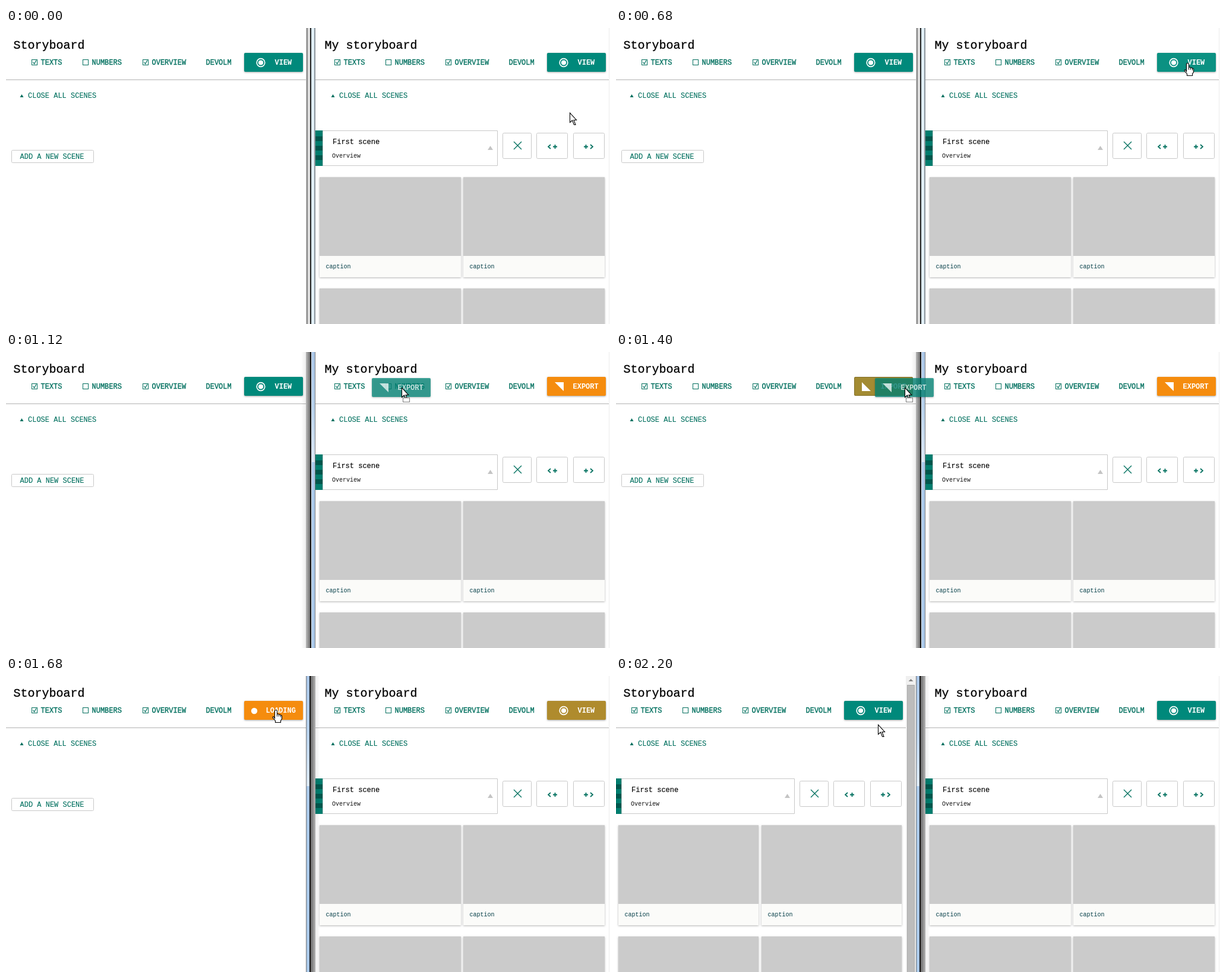
These frames come from a looping animation (1017x500 px, 3320 ms). An HTML page with a canvas:

```html
<!DOCTYPE html>
<html lang="en">
<head>
<meta charset="utf-8">
<title>Storyboard drag and drop</title>
<style>
html, body { margin: 0; width: 100%; height: 100%; overflow: hidden; background: #fff; }
canvas { display: block; }
</style>
</head>
<body>
<canvas id="stage" width="1017" height="500"></canvas>
<script>
const ctx = document.getElementById('stage').getContext('2d');
const LOOP = 3320, STEP = 40;
const TEAL = [0, 137, 123], HOVER = [11, 145, 130], ORANGE = [245, 140, 14];
const INK = '#00705f', LINE = '#c8c8c8', GREY = '#cbcbcb';

const ramp = (t, a, b) => Math.min(1, Math.max(0, (t - a) / (b - a)));
const lerp = (a, b, u) => a + (b - a) * u;
const smooth = u => u * u * (3 - 2 * u);
const mix = (a, b, u) => a.map((v, i) => Math.round(lerp(v, b[i], u)));
const rgb = c => `rgb(${c})`;

function rect(x, y, w, h, color) {
  ctx.fillStyle = color;
  ctx.fillRect(x, y, w, h);
}

function poly(points, color) {
  ctx.beginPath();
  points.forEach(([x, y]) => ctx.lineTo(x, y));
  ctx.closePath();
  ctx.fillStyle = color;
  ctx.fill();
}

function lines(color, width, ...paths) {
  ctx.strokeStyle = color;
  ctx.lineWidth = width;
  ctx.beginPath();
  for (const path of paths)
    path.forEach(([x, y], i) => i ? ctx.lineTo(x, y) : ctx.moveTo(x, y));
  ctx.stroke();
}

function disc(x, y, r, color) {
  ctx.beginPath();
  ctx.arc(x, y, r, 0, 7);
  ctx.fillStyle = color;
  ctx.fill();
}

function outline(x, y, w, h, r = 2) {
  ctx.beginPath();
  ctx.roundRect(x + .5, y + .5, w - 1, h - 1, r);
  ctx.strokeStyle = LINE;
  ctx.lineWidth = 1;
  ctx.stroke();
}

function text(s, x, y, size, color, { bold = false, heavy = 0 } = {}) {
  ctx.font = `${bold ? 'bold ' : ''}${size}px "Liberation Mono", monospace`;
  ctx.fillStyle = color;
  ctx.fillText(s, x, y);
  if (heavy) {
    ctx.strokeStyle = color;
    ctx.lineWidth = heavy;
    ctx.strokeText(s, x, y);
  }
}

function shadow(color, blur, dy) {
  ctx.shadowColor = color;
  ctx.shadowBlur = blur;
  ctx.shadowOffsetY = dy;
}

function button(x, y, label, color, pressed) {
  ctx.save();
  if (!pressed) shadow('rgba(0,0,0,.35)', 3, 1);
  ctx.beginPath();
  ctx.roundRect(x, y, 99, 32, 2);
  ctx.fillStyle = rgb(color);
  ctx.fill();
  ctx.restore();
  if (pressed) {
    ctx.beginPath();
    ctx.roundRect(x + .5, y + .5, 98, 31, 2);
    ctx.strokeStyle = 'rgba(0,0,0,.2)';
    ctx.lineWidth = 1;
    ctx.stroke();
  }
  const inset = { VIEW: 51.5, EXPORT: 43.5, IMPORT: 44.5, LOADING: 36.5 }[label];
  if (label === 'VIEW') {
    ctx.beginPath();
    ctx.arc(x + 28, y + 16.5, 6.8, 0, 7);
    ctx.strokeStyle = '#fff';
    ctx.lineWidth = 1.7;
    ctx.stroke();
    disc(x + 28, y + 16.5, 4.1, '#fff');
  } else if (label === 'EXPORT') {
    poly([[x + 13, y + 9], [x + 28, y + 9], [x + 28, y + 24]], '#fff');
  } else if (label === 'IMPORT') {
    poly([[x + 13, y + 9], [x + 13, y + 24], [x + 28, y + 24]], '#fff');
  } else {
    disc(x + 17, y + 17, 5.2, '#fff');
  }
  text(label, x + inset, y + 20, 12, '#fff', { bold: true });
}

function checkbox(x, checked) {
  ctx.strokeStyle = INK;
  ctx.lineWidth = 1;
  ctx.strokeRect(x + .5, 53.5, 9, 9);
  if (checked) lines(INK, 1.2, [[x + 2.5, 57.5], [x + 4.5, 60.5], [x + 8, 54.5]]);
}

function header(left, right, title, textX, buttonX) {
  text(title, textX - .5, 35, 20, '#000', { heavy: .3 });
  const items = [['TEXTS', -342, true], ['NUMBERS', -256, false], ['OVERVIEW', -155, true]];
  for (const [label, dx, checked] of items) {
    checkbox(buttonX + dx - 16, checked);
    text(label, buttonX + dx - .5, 62, 12, INK, { heavy: .35 });
  }
  text('DEVOLM', buttonX - 64.5, 62, 12, INK, { heavy: .35 });
  rect(left, 87, right - left, 1, '#b2b2b2');
  const x = textX + 10.5;
  poly([[x, 117], [x + 3, 112], [x + 6, 117]], INK);
  text('CLOSE ALL SCENES', textX + 24, 118, 12, INK, { heavy: .1 });
}

function card(x, y, w) {
  ctx.save();
  shadow('rgba(0,0,0,.3)', 3, 1);
  rect(x, y, w, 169, '#fbfbf9');
  ctx.restore();
  rect(x, y, w, 133, GREY);
  text('caption', x + 10.5, y + 154, 10, '#003c46');
}

// right: end of the scene box; every control is placed from it
function scene(left, stripe, right, textX, cards, cardW) {
  rect(left, 173, stripe, 60, '#007d6e');
  for (const y of [183, 199, 215]) rect(left, y, stripe, 8, '#00564c');
  const boxX = left + stripe;
  outline(boxX - 1, 173, right - boxX + 1, 60, 0);
  text('First scene', textX, 196, 12, '#000', { heavy: .15 });
  text('Overview', textX - 1, 219, 10, '#111');
  poly([[right - 17, 206], [right - 12.5, 199], [right - 8, 206]], '#c4c4c4');

  outline(right + 8, 177, 49, 44);
  outline(right + 65, 177, 53, 44);
  outline(right + 127, 177, 53, 44);
  const c = right + 33.5;
  lines(INK, 1.4, [[c - 6.5, 192], [c + 6.5, 205]], [[c + 6.5, 192], [c - 6.5, 205]]);
  const plus = x => lines(INK, 1.8, [[x - 3.5, 200.5], [x + 3.5, 200.5]], [[x, 197], [x, 204]]);
  const chevron = (x, dir) => lines(INK, 1.7, [[x + dir * 4, 197], [x, 200.5], [x + dir * 4, 204]]);
  chevron(right + 85, 1);
  plus(right + 96.5);
  plus(right + 148.5);
  chevron(right + 160, -1);

  for (const y of [252, 440]) for (const x of cards) card(x, y, cardW);
}

function scrollbar() {
  rect(488, 0, 17, 500, '#f0f0f0');
  poly([[492.5, 9], [496.5, 5], [500.5, 9]], '#858585');
  rect(490, 15, 13, 485, '#a8a8a8');
  rect(491, 16, 11, 484, '#bcbcbc');
}

function glass(x, w) {
  const g = ctx.createLinearGradient(0, 0, 0, 186);
  g.addColorStop(0, '#a9c5e6');
  g.addColorStop(.5, '#b5cfea');
  g.addColorStop(1, '#dbe7f3');
  rect(x, 0, w, 186, g);
  rect(x, 186, w, 314, '#aac8e8');
}

function shade(x, w, from, to) {
  const g = ctx.createLinearGradient(x, 0, x + w, 0);
  g.addColorStop(0, from);
  g.addColorStop(1, to);
  rect(x, 0, w, 500, g);
}

function divider(active) {
  if (active === 'left') {
    rect(505, 0, 1, 500, '#777');
    glass(506, 5);
    rect(511, 0, 2, 500, '#111');
    shade(513, 8, '#686868', '#b4b4b4');
    shade(521, 8, 'rgba(0,0,0,.07)', 'rgba(0,0,0,0)');
  } else if (active === 'right') {
    shade(497, 8, 'rgba(0,0,0,0)', 'rgba(0,0,0,.07)');
    shade(505, 7, '#bbb', '#707070');
    rect(512, 0, 2, 500, '#111');
    rect(514, 0, 1, 500, '#e4edf6');
    glass(515, 5);
    rect(520, 0, 1, 500, '#777');
  } else {
    rect(505, 0, 1, 500, '#d0d0d0');
    rect(506, 0, 2, 500, '#858585');
    rect(508, 0, 4, 500, '#dedede');
    rect(512, 0, 2, 500, '#222');
    rect(514, 0, 5, 500, '#e0eef7');
    rect(519, 0, 2, 500, '#8b949a');
  }
}

function pointer(d) {
  const p = new Path2D(d);
  ctx.fillStyle = '#fff';
  ctx.fill(p);
  ctx.strokeStyle = '#000';
  ctx.lineWidth = 1.1;
  ctx.stroke(p);
}

function cursor(kind, x, y) {
  ctx.save();
  ctx.translate(Math.round(x) + .5, Math.round(y) + .5);
  if (kind === 'hand') {
    pointer('M-2 14V1.5Q-2 0 0 0T2 1.5V7Q4 5.5 5 8Q7 6.5 8 9Q10 8 10 10.5V15L8 18V21H-1V18L-5 13.5Q-6 11 -4 11Z');
    lines('#000', 1, [[2, 7], [2, 11]], [[5, 8], [5, 11]], [[8, 9], [8, 12]]);
  } else {
    pointer('M0 0V16L4 12.5L7 20H9.5L6.5 12H11Z');
    if (kind === 'drag') {
      rect(2, 17, 12, 7, '#fff');
      ctx.setLineDash([1, 1]);
      ctx.strokeStyle = '#000';
      ctx.strokeRect(2, 17, 11, 7);
    }
  }
  ctx.restore();
}

function pointerAt(t) {
  if (t < 880) {
    const u = smooth(ramp(t, 280, 680));
    return [lerp(949, 962, u), lerp(143, 59, u)];
  }
  if (t < 1440) return [lerp(962, 486, 1 - (1 - ramp(t, 880, 1400)) ** 1.57), 60];
  if (t < 2000) {
    const u = 1 - (1 - ramp(t, 1400, 1640)) ** 2;
    return [lerp(486, 455, u) - 3 * ramp(t, 1640, 1800), lerp(60, 57, u) + ramp(t, 1640, 1800)];
  }
  const u = smooth(ramp(t, 1960, 2200));
  return [lerp(452, 441, u), lerp(58, 82, u)];
}

function draw(t) {
  rect(0, 0, 1017, 500, '#fff');
  const [x, y] = pointerAt(t);
  const dragging = t >= 880 && t < 1440;
  const loaded = t >= 1760;

  const leftX = loaded ? 384 : 401;
  header(0, loaded ? 488 : 505, 'Storyboard', 13, leftX);
  if (loaded) {
    scene(0, 10, 301, 26, [4, 245], 236);
    scrollbar();
  } else {
    outline(9, 206, 139, 22);
    text('ADD A NEW SCENE', 23.5, 221, 12, INK, { heavy: .1 });
  }
  const leftLabel = t < 1340 || t >= 2000 ? 'VIEW' : t < 1680 ? 'IMPORT' : 'LOADING';
  const leftHeat = ramp(t, 1320, 1440) - ramp(t, 1980, 2120);
  button(leftX, 42, leftLabel, mix(TEAL, ORANGE, leftHeat), leftLabel === 'IMPORT');

  header(521, 1015, 'My storyboard', 537, 911);
  scene(521, 13, 828, 550, [528, 770], 238);
  rect(1015, 0, 1, 500, '#ececec');
  const rightLabel = t >= 880 && t < 1600 ? 'EXPORT' : 'VIEW';
  const rightHeat = ramp(t, 860, 980) - ramp(t, 1640, 1780);
  const rest = t < 880 ? mix(TEAL, HOVER, ramp(t, 520, 640)) : TEAL;
  button(911, 42, rightLabel, mix(rest, ORANGE, rightHeat));

  divider(t < 720 ? 'none' : t < 1480 ? 'right' : 'left');

  if (dragging) {
    ctx.globalAlpha = .73;
    button(Math.round(x) - 50, 44, 'EXPORT', TEAL);
    ctx.globalAlpha = 1;
  }
  cursor(dragging ? 'drag' : y < 74 ? 'hand' : 'arrow', x, y);
}

const start = performance.now();
function tick() {
  const t = (performance.now() - start) % LOOP;
  draw(Math.floor(t / STEP) * STEP);
  requestAnimationFrame(tick);
}
tick();
</script>
</body>
</html>
```
